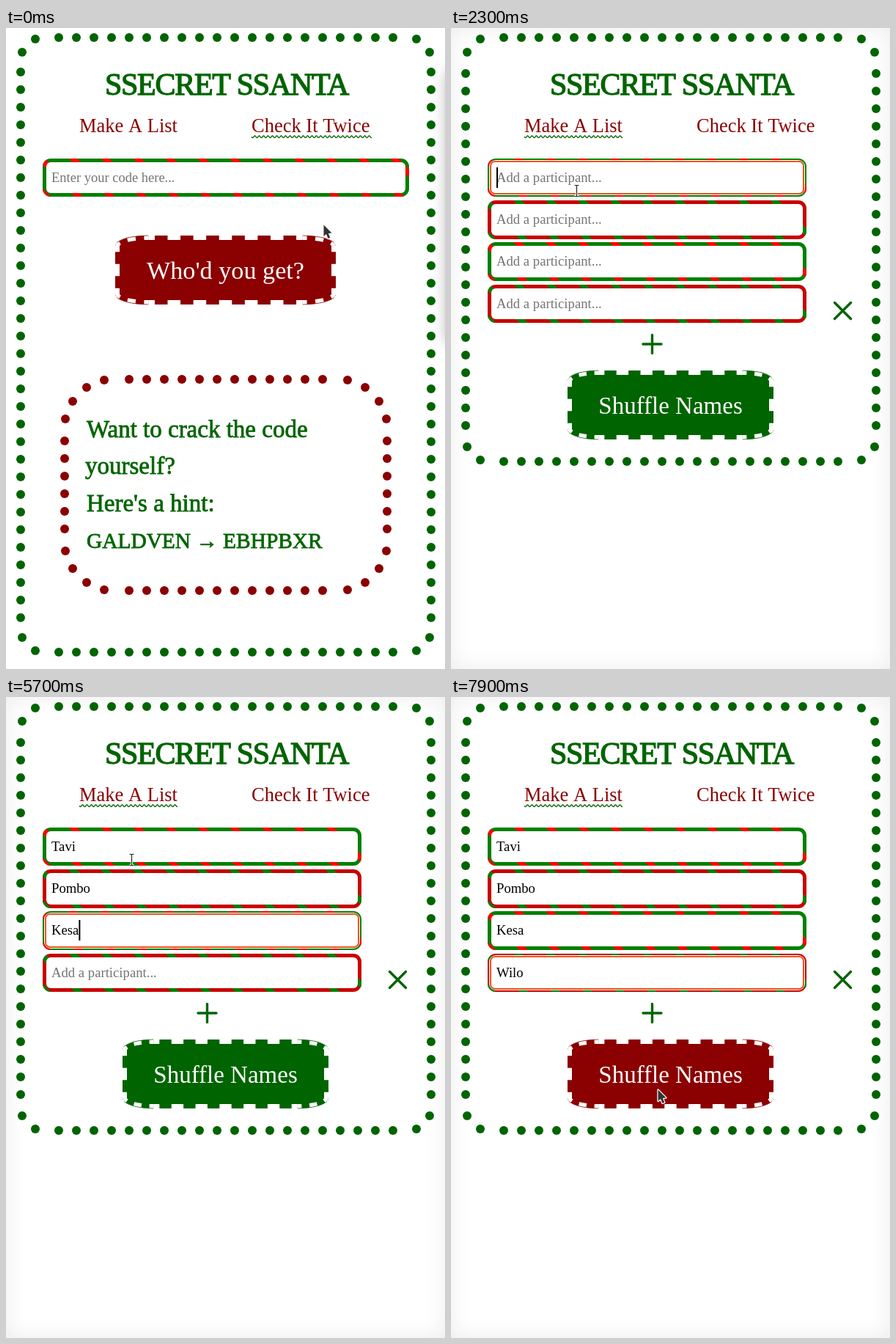
Animation of 599x874 px, one loop 8000 ms. Source, as an HTML page with a canvas:

```html
<!DOCTYPE html>
<html lang="en">
<head>
<meta charset="utf-8">
<title>Gift exchange</title>
<style>
  html, body { margin: 0; width: 599px; height: 874px; overflow: hidden; background: #fff; }
  canvas { display: block; }
</style>
</head>
<body>
<canvas id="stage" width="599" height="874"></canvas>
<script>
const canvas = document.getElementById('stage');
const ctx = canvas.getContext('2d');
const LOOP = 8000, GREEN = '#006400', RED = '#8b0000';
const FIELD_TOP = 178, FIELD_HEIGHT = 52.45, FIELD_PITCH = 57.2;

// Each field: when it gains focus, the name and the time each letter lands.
const fields = [
  { focus: 2300, name: 'Tavi', keys: [3000, 3200, 3200, 3300] },
  { focus: 3500, name: 'Pombo', keys: [3800, 4000, 4100, 4200, 4300] },
  { focus: 4700, name: 'Kesa', keys: [5200, 5400, 5500, 5700] },
  { focus: 5900, name: 'Wilo', keys: [6300, 6500, 6700, 6900] }
];

// Pointer stops: time, x, y.
const path = [
  [0, 433, 268], [600, 190, 136], [1600, 190, 136], [2000, 171.5, 222],
  [7300, 171.5, 222], [7500, 232, 400], [7700, 287, 574], [7900, 282, 535], [LOOP, 282, 535]
];

const clamp = v => Math.max(0, Math.min(1, v));

function pointerAt(t) {
  const i = path.findIndex((p, k) => k + 1 < path.length && t < path[k + 1][0]);
  const [t0, x0, y0] = path[i], [t1, x1, y1] = path[i + 1];
  const u = (t - t0) / (t1 - t0), e = u * u * (3 - 2 * u);
  return { x: x0 + (x1 - x0) * e, y: y0 + (y1 - y0) * e };
}

const inside = (p, x, y, w, h) => p.x >= x && p.x <= x + w && p.y >= y && p.y <= y + h;

function text(str, x, y, size, color, { weight = 0, spacing = 0, align = 'left' } = {}) {
  ctx.font = `${size}px "Liberation Serif", serif`;
  ctx.letterSpacing = spacing + 'px';
  ctx.textAlign = align;
  ctx.fillStyle = ctx.strokeStyle = color;
  ctx.fillText(str, x, y);
  if (weight) {
    ctx.lineWidth = weight;
    ctx.strokeText(str, x, y);
  }
}

function lines(color, width, ...polylines) {
  ctx.strokeStyle = color;
  ctx.lineWidth = width;
  ctx.beginPath();
  for (const points of polylines) {
    points.forEach(([x, y], i) => i ? ctx.lineTo(x, y) : ctx.moveTo(x, y));
  }
  ctx.stroke();
}

function dot(x, y) {
  ctx.beginPath();
  ctx.arc(x, y, 6, 0, 7);
  ctx.fill();
}

// Dotted frame: evenly spaced sides, plus corner dots given as insets from the frame.
function dottedFrame(left, top, right, bottom, insetX, insetY, corners, color) {
  ctx.fillStyle = color;
  for (let x = left + insetX; x <= right - insetX; x += 24) { dot(x, top); dot(x, bottom); }
  for (let y = top + insetY; y <= bottom - insetY; y += 24) { dot(left, y); dot(right, y); }
  for (const [dx, dy] of corners) {
    for (const x of [left + dx, right - dx]) { dot(x, top + dy); dot(x, bottom - dy); }
  }
}

function roundBox(x, y, w, h, r) {
  ctx.beginPath();
  ctx.roundRect(x, y, w, h, r);
}

// Candy-cane border: diagonal stripes counted from the bottom left corner.
function stripedBox(x, top, w, base, stripe, focused) {
  const y = Math.round(top), h = Math.round(top + FIELD_HEIGHT) - y;
  const period = 31 * Math.SQRT2, band = 8 * Math.SQRT2;
  ctx.save();
  roundBox(x, y, w, h, 11);
  ctx.clip();
  ctx.fillStyle = base;
  ctx.fillRect(x, y, w, h);
  ctx.fillStyle = stripe;
  for (let sx = x; sx < x + w + h; sx += period) {
    ctx.beginPath();
    ctx.moveTo(sx, y + h);
    ctx.lineTo(sx + band, y + h);
    ctx.lineTo(sx + band - h, y);
    ctx.lineTo(sx - h, y);
    ctx.fill();
  }
  ctx.restore();
  const edge = focused ? 2 : 5;
  ctx.fillStyle = '#fff';
  roundBox(x + edge, y + edge, w - 2 * edge, h - 2 * edge, focused ? 9 : 6);
  ctx.fill();
  if (focused) {
    ctx.strokeStyle = '#e95420';
    ctx.lineWidth = 2;
    roundBox(x + 4, y + 4, w - 8, h - 8, 6);
    ctx.stroke();
  }
}

// One run of white dashes that starts and ends on half a dash.
function dashes(length, periods) {
  const d = length / periods / 2;
  ctx.setLineDash([d, d]);
  ctx.lineDashOffset = d / 2;
  ctx.stroke();
}

function button(x, y, w, label, baseline, size, color) {
  const h = 94, rx = w * 0.15, ry = h * 0.15, cx = x + w / 2, cy = y + h / 2;
  const eachCorner = paint => {
    for (const sx of [1, -1]) for (const sy of [1, -1]) {
      ctx.save();
      ctx.translate(cx, cy);
      ctx.scale(sx, sy);
      ctx.beginPath();
      paint(w / 2 - rx, h / 2 - ry);
      ctx.restore();
    }
  };
  ctx.save();
  roundBox(x, y, w, h, { x: rx, y: ry });
  ctx.fillStyle = color;
  ctx.fill();
  ctx.clip();
  ctx.strokeStyle = '#fff';
  ctx.lineWidth = 6;
  eachCorner((ox, oy) => {
    ctx.ellipse(ox, oy, rx - 3, ry - 3, 0, 0, Math.PI / 2);
    dashes(rx, 2);
  });
  for (const side of [1, -1]) {
    const ex = cx + side * (w / 2 - 3), ey = cy + side * (h / 2 - 3);
    ctx.beginPath();
    ctx.moveTo(x + rx, ey);
    ctx.lineTo(x + w - rx, ey);
    dashes(w - 2 * rx, 6);
    ctx.beginPath();
    ctx.moveTo(ex, y + ry);
    ctx.lineTo(ex, y + h - ry);
    dashes(h - 2 * ry, 2);
  }
  ctx.restore();
  ctx.strokeStyle = color;
  ctx.lineWidth = 0.7;
  eachCorner((ox, oy) => {
    ctx.ellipse(ox, oy, rx, ry, 0, 0.35, Math.PI / 2);
    ctx.stroke();
  });
  text(label, cx, baseline, size, '#fff', { align: 'center' });
}

function wavyLine(x0, x1) {
  const points = [];
  for (let x = x0; x <= x1; x += 0.5) points.push([x, 148.3 + 1.3 * Math.sin((x - x0) * Math.PI / 3)]);
  lines(GREEN, 1.3, points);
}

function pointer(p, beam) {
  ctx.save();
  ctx.translate(p.x, p.y);
  ctx.lineJoin = 'round';
  if (beam) {
    const shape = [[[-3, -7.5], [3, -7.5]], [[0, -7.5], [0, 7.5]], [[-3, 7.5], [3, 7.5]]];
    lines('#fff', 3, ...shape);
    lines('#222', 1.2, ...shape);
  } else {
    ctx.beginPath();
    [[0.5, 0.5], [0.5, 16], [4, 13], [6.5, 19], [9.3, 17.8], [6.8, 12], [11.5, 11.5]]
      .forEach(([x, y]) => ctx.lineTo(x, y));
    ctx.closePath();
    ctx.strokeStyle = '#fff';
    ctx.lineWidth = 2.4;
    ctx.stroke();
    ctx.fillStyle = '#333';
    ctx.fill();
  }
  ctx.restore();
}

function codePage() {
  dottedFrame(20, 13, 580, 851, 52, 47, [[20, 2], [2, 20]], GREEN);
  stripedBox(50, FIELD_TOP, 500, '#008000', '#f00', false);
  text('Enter your code here...', 62, 210, 18.5, '#757575');
  button(149, 283, 301, "Who'd you get?", 342, 34.2, RED);
  dottedFrame(80, 479, 520, 767, 88, 84, [[54, 1], [30, 11], [11, 30], [1, 54]], RED);
  const bold = { weight: 0.8 };
  text('Want to crack the code', 110, 558, 33, GREEN, bold);
  text('yourself?', 108, 608, 33, GREEN, bold);
  text("Here's a hint:", 110, 659, 33, GREEN, bold);
  text('GALDVEN → EBHPBXR', 110, 709, 29.4, GREEN, bold);
}

const fieldTop = i => FIELD_TOP + i * FIELD_PITCH;

function listPage(t, p) {
  dottedFrame(20, 13, 580, 591, 52, 49, [[20, 2], [2, 20]], GREEN);
  fields.forEach((f, i) => {
    const next = fields[i + 1], y = fieldTop(i);
    const focused = t >= f.focus && (!next || t < next.focus);
    stripedBox(50, y, 435, ...(i % 2 ? ['#c80000', '#008000'] : ['#008000', '#f00']), focused);
    const typed = f.name.slice(0, f.keys.filter(k => t >= k).length);
    text(typed || 'Add a participant...', 62, Math.round(y + 32), 18.7, typed ? '#000' : '#757575');
    if (focused && t < 7100) {
      ctx.fillStyle = '#000';
      ctx.fillRect(62 + (typed ? ctx.measureText(typed).width : 0), Math.round(y + 12), 2, 28);
    }
  });
  ctx.lineCap = 'round';
  lines(GREEN, 3.4, [[523.5, 374.5], [545.5, 396.5]], [[545.5, 374.5], [523.5, 396.5]]);
  lines(GREEN, 3.4, [[262, 431], [287, 431]], [[274.5, 418.5], [274.5, 443.5]]);
  ctx.lineCap = 'butt';
  const hover = inside(p, 159, 467, 281, 94);
  button(159, 467, 281, 'Shuffle Names', 526, 33, hover ? RED : GREEN);
}

// Shadow of a neighbouring window, fading away at the right edge.
function sideShadow(t) {
  const strength = t < 1200 ? 1 - 0.85 * clamp(t / 600) : 0;
  if (!strength) return;
  ctx.save();
  ctx.shadowColor = `rgba(0,0,0,${0.3 * strength})`;
  ctx.shadowBlur = 20;
  ctx.shadowOffsetX = -100;
  ctx.fillRect(701, 60, 60, 368);
  ctx.restore();
}

function draw(now) {
  const t = Math.floor(now % LOOP / 100) * 100;
  const p = pointerAt(t), list = t >= 1400;
  const overMake = inside(p, 99, 113, 136, 39);
  ctx.clearRect(0, 0, 599, 874);
  canvas.style.boxShadow = `inset 0 0 30px rgba(0,0,0,${0.08 * clamp(t / 600)})`;
  sideShadow(t);
  text('SSECRET SSANTA', 135, 91, 42, GREEN, { weight: 1.3, spacing: -1.3 });
  text('Make A List', 100, 142, 26.5, overMake ? GREEN : RED);
  text('Check It Twice', 335, 142, 26.5, RED);
  if (list) {
    wavyLine(100, 234);
    listPage(t, p);
  } else {
    wavyLine(335, 499);
    codePage();
  }
  const overField = list
    ? fields.some((f, i) => inside(p, 50, fieldTop(i), 435, FIELD_HEIGHT))
    : inside(p, 50, FIELD_TOP, 500, FIELD_HEIGHT);
  pointer(p, overMake || overField);
  requestAnimationFrame(() => draw(performance.now() - start));
}

const start = performance.now();
draw(0);
</script>
</body>
</html>
```
